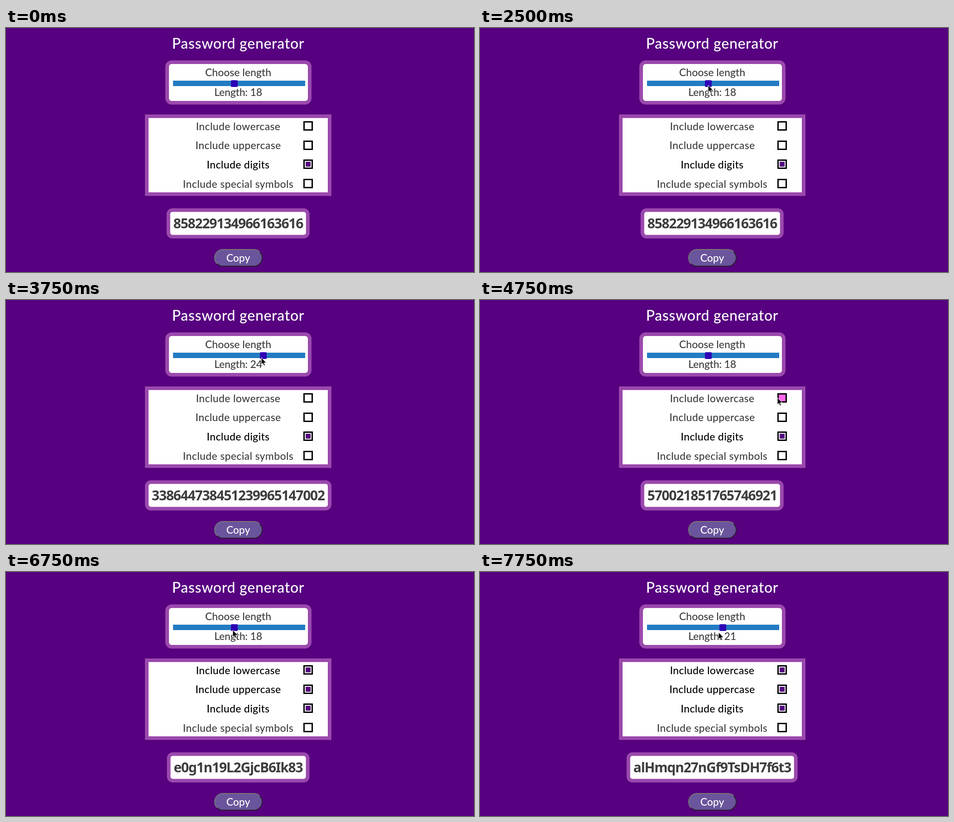
An HTML page that plays this animation: 1034x542 px, repeating every 8 s.

```html
<!DOCTYPE html>
<html lang="en">
<head>
<meta charset="utf-8">
<title>Password generator</title>
<style>
  html, body { margin: 0; width: 100%; height: 100%; overflow: hidden; background: #570080; }
  body { position: relative; font: 500 23px Lato, sans-serif; color: #3d3d3d; }
  body * { position: absolute; box-sizing: border-box; white-space: pre; }
  .text { left: 513px; transform: translate(-50%, -50%); line-height: 1.2; }
  .panel { background: #fff; border: 8px solid #9a49ad; }
  h1 { margin: 0; top: 33.7px; font-size: 32px; font-weight: 500; letter-spacing: .7px; color: #fff; }
  #length-panel { left: 352px; top: 72px; width: 323px; height: 98px; border-radius: 14px; }
  #options { left: 307px; top: 192px; width: 412px; height: 181px; }
  #track { left: 369px; top: 117px; width: 292px; height: 12px; background: #247bc2; }
  #thumb { top: 116px; width: 15px; height: 15px; border-radius: 2px; background: #2d00b5; }
  #length { top: 143.3px; letter-spacing: -.2px; }
  .option { letter-spacing: .35px; }
  .check { left: 657px; width: 21px; height: 21px; border: 3px solid #000; background: #fff; }
  .check i { left: 2px; top: 2px; width: 11px; height: 11px; background: #570080; }
  #result { top: 433.5px; height: 67px; padding: 0 7px; border-radius: 13px;
    font: 700 30px/50px "Noto Sans", sans-serif; letter-spacing: -1.25px; }
  #copy { left: 460px; top: 491px; width: 107px; height: 39px; border-radius: 20px;
    background: #6a559c; border: 2px solid; border-color: #777 #262626 #262626 #777; }
  #copy-label { top: 510.5px; color: #fff; }
  #cursor { left: 0; top: 0; overflow: visible; }
</style>
</head>
<body>
<h1 class="text">Password generator</h1>
<div id="length-panel" class="panel"></div>
<div class="text" style="top:98.5px">Choose length</div>
<div id="track"></div>
<div id="thumb"></div>
<div id="length" class="text"></div>
<div id="options" class="panel"></div>
<div id="result" class="text panel"></div>
<div id="copy"></div>
<div id="copy-label" class="text">Copy</div>
<svg id="cursor" width="14" height="20">
  <path d="M0 0V15.5L3.5 12.3 5.8 17.8 8.4 16.7 6.1 11.3H11Z" stroke="#fff" stroke-width="1"/>
</svg>
<script>
const LOOP = 8000, TICK = 250;
const UNIT = 32 / 3; // slider pixels per character
const $ = id => document.getElementById(id);
const clamp = (v, lo, hi) => Math.min(Math.max(v, lo), hi);

// Pointer stops: x, y, arrival time and, if it rests there, departure time.
const stops = [
  [545, 98, 750],
  [498, 127, 1000, 1250],
  [537, 128, 1500],
  [498, 127, 1750, 2000],
  [504, 127, 2500],
  [564, 128, 3750],
  [504, 128, 4250],
  [657, 217, 4750, 5000],
  [684, 238, 5250],
  [666, 265, 5500, 6000],
  [501, 129, 6750],
  [512, 129, 7000],
  [536, 30, 7250],
  [532, 506, 7500],
  [527, 134, 7750],
];

// Passwords by the time they appear; other lengths in between are random.
const passwords = Object.entries({
  0: "858229134966163616",
  3750: "338644738451239965147002",
  4250: "570021851765746921",
  5000: "6k75ig4bg6eo1pk3ab",
  6000: "e0g1n19L2GjcB6Ik83",
  7250: "alHmqn27nGf9TsDH7f6t3",
});

function pointerAt(t) {
  const i = stops.findLastIndex(stop => stop[2] <= t);
  if (i < 0) return [-50, 0];
  const [x, y, arrive, leave = arrive] = stops[i];
  const next = stops[i + 1];
  if (!next || t <= leave) return [x, y];
  const k = ((t - leave) / (next[2] - leave)) ** 2;
  return [x + (next[0] - x) * k, y + (next[1] - y) * k];
}

// The thumb follows the pointer during two drags.
function lengthAt(t) {
  const held = t < 7000 ? clamp(t, 2500, 4250) : Math.min(t, 7250);
  return 18 + Math.round((pointerAt(held)[0] - 504) / UNIT);
}

function passwordAt(t) {
  const length = lengthAt(t);
  const [, password] = passwords.findLast(([start]) => start <= t);
  if (password.length === length) return password;
  const base = t < 5000 ? 10 : 36;
  let seed = t;
  return Array.from({ length }, () => {
    seed = seed * 16807 % 2147483647;
    return (seed % base).toString(base);
  }).join("");
}

// Each option becomes selected at checkedFrom.
const options = [["lowercase", 5000], ["uppercase", 6000], ["digits", 0], ["special symbols", LOOP]]
  .map(([name, checkedFrom], i) => {
    const add = (className, top, text = "") => {
      const el = document.createElement("div");
      el.className = className;
      el.style.top = top + "px";
      el.textContent = text;
      $("options").after(el);
      return el;
    };
    const top = Math.round(207 + 42.7 * i);
    const label = add("text option", 218.5 + 42.7 * i, "Include " + name);
    const box = add("check", top);
    const mark = box.appendChild(document.createElement("i"));
    return { checkedFrom, top, label, box, mark };
  });

function draw() {
  const t = Math.floor(performance.now() % LOOP / TICK) * TICK;
  const [x, y] = pointerAt(t);
  const length = lengthAt(t);

  $("cursor").style.transform = `translate(${x}px, ${y}px)`;
  $("thumb").style.left = 497 + (length - 18) * UNIT + "px";
  $("length").textContent = "Length: " + length;
  $("result").textContent = passwordAt(t);

  for (const { checkedFrom, top, label, box, mark } of options) {
    const checked = t >= checkedFrom;
    const hovered = x >= 657 && x <= 678 && y >= top && y <= top + 21;
    label.style.color = checked ? "#000" : "";
    box.style.background = hovered ? "#ff66e8" : "";
    mark.style.display = checked ? "" : "none";
  }
  requestAnimationFrame(draw);
}
draw();
</script>
</body>
</html>
```
